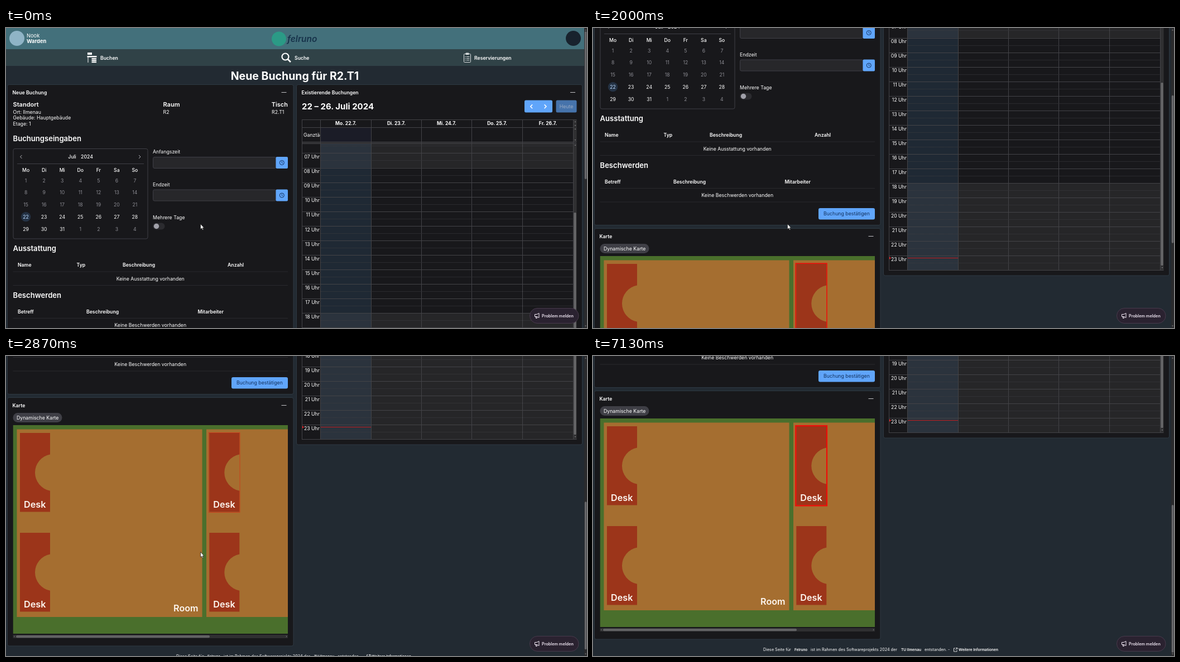
An HTML page that plays this animation: 1041 by 538 pixels, repeating every 7340 ms.

```html
<!DOCTYPE html>
<html lang="de">
<head>
<meta charset="utf-8">
<title>Neue Buchung</title>
<style>
  html, body { margin: 0; width: 100%; height: 100%; overflow: hidden; background: #222a32; }
  svg { display: block; width: 1041px; height: 538px; font-family: Inter, Roboto, sans-serif; }
  text { white-space: pre; }
</style>
</head>
<body>
<svg id="stage" viewBox="0 0 1041 538" xmlns="http://www.w3.org/2000/svg">
  <defs>
    <clipPath id="slots"><rect x="530" y="207" width="487" height="461"/></clipPath>
    <clipPath id="axis"><rect x="530" y="178" width="33" height="27"/></clipPath>
    <clipPath id="map"><rect x="12.5" y="642" width="492.5" height="374"/></clipPath>
  </defs>
</svg>
<script>
const LOOP = 7340, STEP = 1000 / 15;
const WHITE = '#fff', CARD = '#18181b', EDGE = '#3f3f46', BLUE = '#60a5fa', DIM = '#8b8b92';
const stage = document.getElementById('stage');
let layer = stage;

function add(tag, attrs, parent = layer) {
  const el = document.createElementNS('http://www.w3.org/2000/svg', tag);
  for (const k in attrs) el.setAttribute(k, attrs[k]);
  parent.appendChild(el);
  return el;
}
const group = (attrs = {}, parent = stage) => (layer = add('g', attrs, parent));
const box = (x, y, r, b, fill, more = {}) =>
  add('rect', { x, y, width: r - x, height: b - y, fill, ...more });
const line = (x1, y1, x2, y2, stroke = EDGE, more = {}) =>
  add('path', { d: `M${x1} ${y1}L${x2} ${y2}`, stroke, fill: 'none', ...more });
const stroke = (d, color, width = 1, more = {}) =>
  add('path', { d, fill: 'none', stroke: color, 'stroke-width': width, ...more });
const dot = (cx, cy, r, fill, more = {}) => add('circle', { cx, cy, r, fill, ...more });

// y is the middle of the capitals
function label(x, y, str, size = 8.75, weight = 400, fill = WHITE, anchor = 'start', more = {}) {
  add('text', { x, y: y + size * 0.36, 'font-size': size, 'font-weight': weight,
    fill, 'text-anchor': anchor, ...more }).textContent = str;
}
const bold = (x, y, str, anchor) => label(x, y, str, 8.7, 600, WHITE, anchor);
const heading = (y, str) => label(12.5, y, str, 13.1, 600);
const chevron = (x, y, dir, color, s = 3, w = 1) =>
  stroke(`M${x - dir * s / 2} ${y - s}l${dir * s} ${s}l${-dir * s} ${s}`, color, w);

function card(x, y, r, b, title) {
  box(x + .5, y + .5, r - .5, b - .5, CARD, { rx: 3, stroke: '#2e3942' });
  bold(x + 9.5, y + 14.5, title);
  line(r - 22, y + 14.5, r - 13, y + 14.5, '#c4c4c8');
}

function header() {
  box(0, 0, 1036, 38, '#43707b');
  box(0, 38, 1036, 68, '#304247');
  dot(19.5, 18.5, 13.5, '#8fb4c6');
  label(37, 13.5, 'Nook', 9.3);
  label(37, 24, 'Warden', 9.3, 700);
  dot(489, 19.5, 13, '#2b9a86');
  label(504, 19.5, 'felruno', 15.5, 600, '#17324a', 'start', { 'font-style': 'italic' });
  dot(1016.5, 18.5, 13.5, '#18222d');

  // desk, magnifier and clipboard
  box(146, 44, 154, 48, WHITE);
  box(145.5, 50, 162.5, 52.5, WHITE);
  stroke('M147 52V62', WHITE);
  for (const y of [54, 57, 60]) box(153.5, y, 162, y + 2.2, WHITE);
  bold(169, 53.5, 'Buchen');
  dot(500.5, 51.5, 6, 'none', { stroke: WHITE, 'stroke-width': 2.2 });
  line(505, 56, 510, 61, WHITE, { 'stroke-width': 2.6 });
  bold(517, 53.5, 'Suche');
  box(820.5, 46.5, 832.5, 61.5, 'none', { rx: 1, stroke: '#d8dcde' });
  box(823.5, 44.5, 829.5, 48, '#d8dcde', { rx: 1 });
  for (const y of [51.5, 54.5, 57.5]) line(822.5, y, 830.5, y, '#d8dcde', { 'stroke-dasharray': '1.5 1 6' });
  bold(839, 53.5, 'Reservierungen');
  label(517.5, 85.5, 'Neue Buchung für R2.T1', 19.5, 700, WHITE, 'middle');
}

function datePicker() {
  box(13, 216.5, 254, 378, CARD, { rx: 3, stroke: EDGE });
  chevron(27, 231, -1, '#b4b4ba');
  chevron(239.5, 231, 1, '#b4b4ba');
  label(118.5, 231, 'Juli', 8.7, 500, WHITE, 'middle');
  label(145, 231, '2024', 8.7, 500, WHITE, 'middle');
  line(20, 243.5, 247, 243.5);
  const colX = i => 35.6 + 32.55 * i;
  'Mo Di Mi Do Fr Sa So'.split(' ').forEach((d, i) =>
    label(colX(i), 255.2, d, 8.7, 500, WHITE, 'middle'));
  dot(35.6, 338.6, 8.7, '#243244');
  for (let i = 0; i < 35; i++) {
    const color = i === 21 ? '#bcdcff' : i < 21 || i > 30 ? DIM : WHITE;
    label(colX(i % 7), 273.6 + 21.7 * Math.floor(i / 7), i > 30 ? i - 30 : i + 1, 8.7, 400, color, 'middle');
  }
}

function timeField(y, name) {
  label(263, y, name);
  box(263.5, y + 9.5, 484, y + 29.5, '#27272a', { rx: 2.5, stroke: EDGE });
  box(483.5, y + 9, 505, y + 30, BLUE, { rx: 2 });
  dot(494.3, y + 19.5, 4, 'none', { stroke: '#12315c' });
  stroke(`M494.3 ${y + 17}v2.8l1.7 1`, '#12315c', .9);
}

function table(y, heads, empty) {
  heads.forEach(([x, str]) => bold(x, y, str));
  label(258.7, y + 24.5, empty, 8.75, 400, WHITE, 'middle');
  line(12.5, y + 12, 505, y + 12, '#29292d');
  line(12.5, y + 36.5, 505, y + 36.5, '#29292d');
}

function form() {
  card(2, 101, 515.5, 587, 'Neue Buchung');
  label(12.5, 137, 'Standort', 11, 600);
  label(281.5, 137, 'Raum', 11, 600);
  label(505, 137, 'Tisch', 11, 600, WHITE, 'end');
  label(12.5, 150.5, 'Ort: Ilmenau');
  label(12.5, 161.3, 'Gebäude: Hauptgebäude');
  label(12.5, 172, 'Etage: 1');
  label(281.5, 150.5, 'R2');
  label(476, 150.5, 'R2.T1');
  heading(198.5, 'Buchungseingaben');
  datePicker();
  timeField(222, 'Anfangszeit');
  timeField(280.5, 'Endzeit');
  label(263, 339.5, 'Mehrere Tage');
  box(263, 349.5, 284.5, 361.5, '#2b2b2f', { rx: 6 });
  dot(269.5, 355.5, 4.7, '#a1a1aa');
  heading(395.5, 'Ausstattung');
  table(425, [[21, 'Name'], [126.5, 'Typ'], [209, 'Beschreibung'], [397, 'Anzahl']],
    'Keine Ausstattung vorhanden');
  heading(479, 'Beschwerden');
  table(508.5, [[21, 'Betreff'], [144, 'Beschreibung'], [343.5, 'Mitarbeiter']],
    'Keine Beschwerden vorhanden');
  box(404, 556, 505, 576.5, BLUE, { rx: 3 });
  label(454.5, 566.3, 'Buchung bestätigen', 8.75, 400, '#12315c', 'middle');
}

function calendar(page) {
  const cols = [563.5, 654.5, 744.5, 834.5, 925.5, 1016.5];
  const hourY = h => 511 + 26.05 * (h - 18);
  const GRID = '#434347';
  card(520, 101, 1033, 677.5, 'Existierende Buchungen');
  label(530, 140.5, '22 – 26. Juli 2024', 15, 700);
  box(929, 129.5, 979, 151.5, BLUE, { rx: 2.5 });
  chevron(941.5, 140.8, -1, WHITE, 3.4, 1.5);
  chevron(966.3, 140.8, 1, WHITE, 3.4, 1.5);
  box(985.5, 129.5, 1022.5, 151.5, '#4673ab', { rx: 2.5 });
  label(1004, 140.8, 'Heute', 8.75, 400, '#9aabc4', 'middle');

  box(564, 178, 654, 204, '#1b1c27');
  ['Mo. 22.7.', 'Di. 23.7.', 'Mi. 24.7.', 'Do. 25.7.', 'Fr. 26.7.'].forEach((d, i) =>
    label((cols[i] + cols[i + 1]) / 2, 171.3, d, 8.5, 700, WHITE, 'middle'));

  group({ 'clip-path': 'url(#slots)' }, page);
  box(564, 200, 654, 668, '#1f2934');
  for (const [a, b] of [[6, 8], [18, 24]]) {
    box(654, hourY(a), 1016, hourY(b), '#262628');
    box(564, hourY(a), 654, hourY(b), '#2b333d');
  }
  for (let h = 6; h < 24; h++) {
    const y = Math.round(hourY(h)) + .5;
    line(530, y, 1016, y, GRID);
    line(564, y + 13, 1016, y + 13, '#3c3c40', { 'stroke-dasharray': '1 1' });
    label(562, hourY(h) + 6.7, String(h).padStart(2, '0') + ' Uhr', 8.7, 400, WHITE, 'end');
  }
  line(564, 645.5, 654, 645.5, '#c01c20');
  add('path', { d: 'M531 643l3 2.5l-3 2.5z', fill: '#e01c20' });

  group({ 'clip-path': 'url(#axis)' }, page);
  label(533, 192, 'Ganztägig');

  group({}, page);
  for (const y of [164.5, 178.5, 204.5, 207.5, 667.5]) line(530, y, 1022.5, y, GRID);
  box(530, 205, 1022, 207, '#2a2a2d');
  line(530.5, 164.5, 530.5, 667.5, GRID);
  for (const x of cols) line(x, 164.5, x, 667.5, GRID);
  box(1017, 165, 1022.5, 204, '#303032');
  box(1017, 208, 1022.5, 667, '#303032');
  box(1017.5, 331, 1021.5, 659, '#68686a', { rx: 1.5 });
  for (const y of [168, 181, 210]) add('path', { d: `M1018.5 ${y + 1}h3l-1.5-2z`, fill: '#77777a' });
  for (const y of [175, 201, 663]) add('path', { d: `M1018.5 ${y - 1}h3l-1.5 2z`, fill: '#77777a' });
}

function desk(x, y) {
  add('path', { d: `M${x} ${y}h54v38.4a33.3 33.3 0 0 0 0 65.4v37.7h-54z`, fill: '#9c351a' });
  label(x + 26.7, y + 128, 'Desk', 16.2, 600, '#fdf6f0', 'middle');
}

function floorMap(page) {
  card(2, 592, 515.5, 1038.5, 'Karte');
  box(12.5, 620, 100.5, 637, EDGE, { rx: 8.5 });
  label(56.7, 628.7, 'Dynamische Karte', 8.75, 400, WHITE, 'middle');
  group({ 'clip-path': 'url(#map)' }, page);
  box(12.5, 642, 505, 1016, '#4a6f2c');
  box(19.5, 649.5, 351.5, 986, '#a56e30');
  box(359, 649.5, 505, 986, '#a56e30');
  for (const y of [656, 835]) { desk(25, y); desk(364.3, y); }
  label(344.5, 970.5, 'Room', 16.1, 600, '#fdf6f0', 'end');
  const mark = box(363.3, 655.2, 419, 798.4, 'none', { stroke: '#f00c08' });
  group({}, page);
  box(12.5, 1018, 505, 1024, '#2f2f31');
  box(18, 1019, 365, 1023.2, '#626264', { rx: 2 });
  chevron(15, 1021, -1, '#77777a', 1.3);
  chevron(502.5, 1021, 1, '#77777a', 1.3);
  return mark;
}

function footer() {
  const y = 1056.7;
  label(305, y, 'Diese Seite für', 7.2);
  label(361, y, 'Felruno', 6.4, 600);
  label(390, y, 'ist im Rahmen des Softwareprojekts 2024 der', 7.2);
  label(552, y, 'TU Ilmenau', 6.6, 600);
  label(594, y, 'entstanden. -', 7.2);
  stroke('M649 1054h-2.5v6h5.500v-2.500M649.500 1057l3.200-3.500M650.200 1053.500h2.500v2.500', WHITE, .8);
  label(655, y, 'Weitere Informationen', 6.6, 600);
}

const page = group();
header();
form();
calendar(page);
const mark = floorMap(page);
footer();

group();
box(938.5, 502.5, 1026, 529.5, '#2a2230', { rx: 13.5, stroke: '#483a4c' });
stroke('M947.500 513.500h3.500l4-2v8l-4-2h-3.500zM949 517.500l.6 3h1.800l-.4-3', '#efe6f2', 1);
label(960, 516, 'Problem melden', 7.25, 600, '#efe6f2');
box(1036, 0, 1041, 538, '#2a2a2c');
const thumb = box(1036.8, 6, 1040.4, 271, '#67676a', { rx: 1.8 });
add('path', { d: 'M1037 4.500h3l-1.500-2z', fill: '#77777a' });
add('path', { d: 'M1037 533.500h3l-1.500 2z', fill: '#77777a' });
const cursor = add('path', {
  d: 'M0 0V9.300L2.200 7.400L3.700 10.700L5.100 10.100L3.700 6.900H6.400Z',
  fill: WHITE, stroke: '#1a1a1a', 'stroke-width': .7
});

const SCROLL = [[1533, 0], [1600, 5], [1667, 30], [1733, 70], [2000, 233],
  [2267, 350], [2600, 458], [2800, 507], [2900, 524], [3000, 530]];
const POINTER = [[2930, 348.5, 351.5], [3130, 367, 311], [3400, 405, 222], [3650, 424, 178],
  [3867, 428.3, 169.8], [3933, 436, 175], [4100, 434, 186], [4400, 365, 255],
  [4733, 225.5, 341], [4867, 51.5, 379], [4933, -40, 399]];

function at(keys, t) {
  if (t <= keys[0][0]) return keys[0].slice(1);
  const i = keys.findIndex(k => k[0] > t);
  if (i < 0) return keys[keys.length - 1].slice(1);
  const a = keys[i - 1], b = keys[i], u = (t - a[0]) / (b[0] - a[0]);
  return a.slice(1).map((v, j) => v + (b[j + 1] - v) * u);
}

const smooth = u => { u = Math.min(1, Math.max(0, u)); return u * u * (3 - 2 * u); };

// one-second pulse with a rest at both ends
function pulse(t) {
  const p = (t / 1000 + .2) % 1;
  return p < .47 ? smooth(p / .33) : 1 - smooth((p - .47) / .38);
}

function draw(ms) {
  const t = Math.floor((ms % LOOP + 4) / STEP) * STEP;
  const [scroll] = at(SCROLL, t), [x, y] = at(POINTER, t), v = pulse(t);
  page.setAttribute('transform', `translate(0 ${-Math.round(scroll)})`);
  thumb.setAttribute('y', 6 + scroll * .4925);
  cursor.setAttribute('transform', `translate(${x} ${y})`);
  mark.setAttribute('stroke-width', .25 + 1.95 * v);
}

const start = performance.now();
function tick() {
  draw(performance.now() - start);
  requestAnimationFrame(tick);
}
draw(0);
requestAnimationFrame(tick);
</script>
</body>
</html>
```
